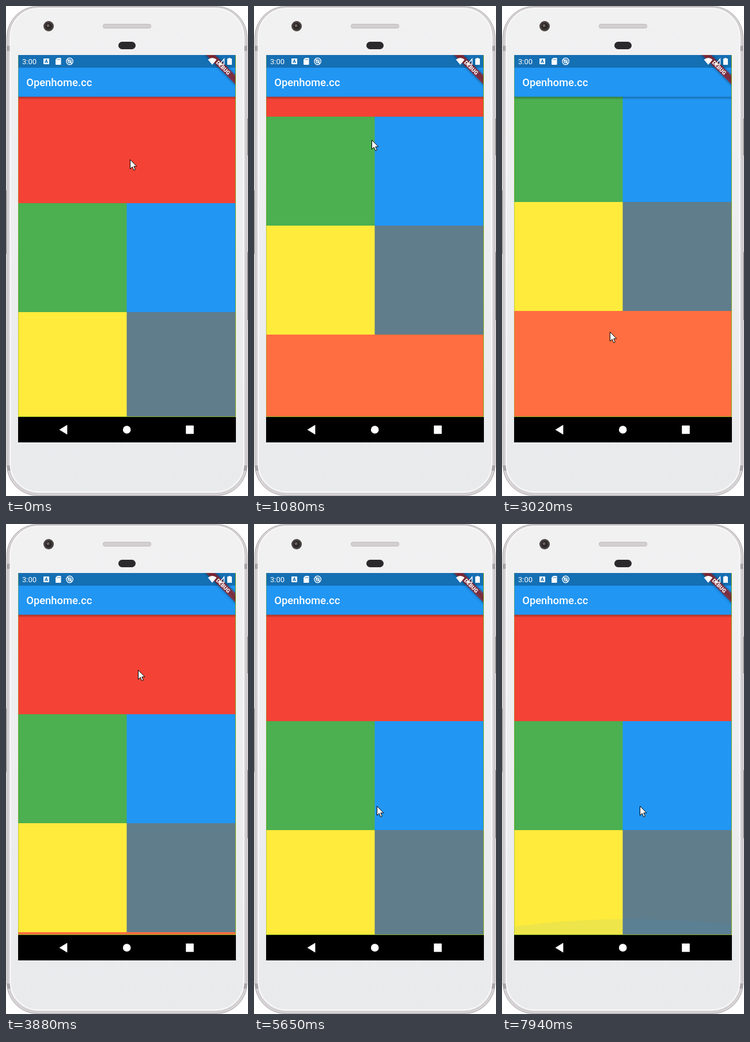
Write an HTML page that moves like this. It is 420 px wide and 850 px high and loops after 8100 ms.

```html
<!DOCTYPE html>
<html lang="en">
<head>
<meta charset="utf-8">
<style>
html, body { margin: 0; height: 100%; overflow: hidden; background: #fff; }
svg { display: block; width: 420px; height: 850px; }
text { font-family: Roboto, sans-serif; fill: #fff; }
.shadow { filter: blur(2.5px); opacity: .5; }
</style>
</head>
<body>
<svg viewBox="0 0 420 850">
  <defs>
    <linearGradient id="face" x2="0" y2="1">
      <stop offset="0" stop-color="#f1f1f2"/><stop offset="1" stop-color="#e9eaec"/>
    </linearGradient>
    <linearGradient id="shade" x2="0" y2="1">
      <stop offset="0" stop-opacity=".3"/><stop offset="1" stop-opacity="0"/>
    </linearGradient>
    <clipPath id="screen"><rect x="21" y="85" width="378" height="672"/></clipPath>
    <clipPath id="view"><rect x="21" y="157" width="378" height="555"/></clipPath>
  </defs>

  <!-- phone -->
  <rect x="306" width="11" height="6" rx="1" fill="#918c8f"/>
  <path d="M0 320h3v110H0zM417 195h3v64h-3zM417 427h3v118h-3z" fill="#aaa6a8"/>
  <rect x="1.5" y=".5" width="417" height="849" rx="54" fill="#dcd9db" stroke="#a39ea1"/>
  <rect x="4.5" y="2.5" width="411" height="844" rx="52" fill="none" stroke="#c3bec1"/>
  <path d="M2 69h7v9H2zM411 69h7v9h-7zM2 797h7v9H2zM411 797h7v9h-7z" fill="#a9a5a8"/>
  <rect x="7.500" y="4" width="405" height="839" rx="49" fill="url(#face)" stroke="#f9f9fa" stroke-width="2"/>
  <circle cx="74" cy="35" r="9" fill="#4b4443"/>
  <circle cx="74" cy="35" r="6" fill="#2c2728"/>
  <circle cx="73" cy="34" r="2.500" fill="#67605f"/>
  <rect x="168.500" y="31.500" width="83" height="7" rx="3" fill="#d3cfd1" stroke="#c0bbbe"/>
  <rect x="195" y="62" width="30" height="13" rx="6.500" fill="#2b292c"/>

  <g clip-path="url(#screen)">
    <g clip-path="url(#view)">
      <g id="tiles"></g>
      <ellipse id="topGlow" rx="565.500" fill="#2196f3"/>
      <ellipse id="bottomGlow" rx="565.500" fill="#2196f3"/>
    </g>
    <rect x="21" y="107" width="378" height="50.500" fill="#2196f3"/>
    <rect x="21" y="157.500" width="378" height="5" fill="url(#shade)"/>
    <rect x="21" y="85" width="378" height="22" fill="#156fb3"/>
    <text x="35.200" y="139" font-size="18.400" font-weight="500">Openhome.cc</text>
    <g transform="translate(377 107) rotate(45)">
      <rect class="shadow" x="-50" y="-5.500" width="100" height="11"/>
      <rect x="-50" y="-5.500" width="100" height="11" fill="#b71c1c" opacity=".63"/>
      <text y="3.300" font-size="9.400" font-weight="900" text-anchor="middle">DEBUG</text>
    </g>

    <!-- status icons -->
    <text x="28" y="101" font-size="13">3:00</text>
    <rect x="65" y="91" width="10" height="10" rx="1" fill="#fff"/>
    <path d="M67.500 99 70 93l2.500 6M68.400 97.200h3.200" fill="none" stroke="#156fb3" stroke-width="1.200"/>
    <path d="M89 90h5.500q1 0 1 1v10q0 1-1 1H87q-1 0-1-1v-8z" fill="#fff"/>
    <path d="M89.300 92v2M91.300 92v2M93.300 92v2" stroke="#156fb3" stroke-width=".8"/>
    <g fill="none" stroke="#fff" stroke-width="1.400">
      <circle cx="110.500" cy="96" r="5.700"/><circle cx="110.500" cy="96" r="2.600"/>
      <path d="M107 92.500l7.500 7.500M370.500 101.300h8V92z"/>
    </g>
    <path d="M350.500 93q7.500-6 15 0l-7.500 9z" fill="#fff"/>
    <path d="M386.500 90h3v1.200h2.500v10.800h-8V91.200h2.500z" fill="#fff"/>

    <rect x="21" y="713" width="378" height="44"/>
    <path d="M21.500 712.500V85" fill="none" stroke="#86a91d" opacity=".5"/>
    <path d="M398.500 85V712.500H21" fill="none" stroke="#86b01d"/>
    <path d="M93 735l13-8v16zM312.500 728h13v14h-13z" fill="#fff" stroke="#fff" stroke-width=".6" stroke-linejoin="round"/>
    <circle cx="209.700" cy="735" r="6.800" fill="#fff"/>
  </g>

  <g id="cursor">
    <path d="M.5 .5v16l3.700-3.500 2.700 6 2.500-1.100-2.600-5.800h5z" fill="#fff" stroke="#000" stroke-linejoin="round"/>
    <circle id="press" r="15" fill="#ff3" opacity=".5"/>
  </g>
</svg>
<script>
const $ = id => document.getElementById(id);
const { PI, sin, cos, floor, ceil, round, min, max } = Math;
const LOOP = 8100, START = 460, BURST = 852, STEP = BURST / 11;
const WAVE_START = 5420, WAVE = 770, WAVE_PEAK = 6490;

// Where the pointer is as each burst begins, and how far it swings away in between
const stops = [
  { x: 215, y: 266, swing: -22 }, { x: 202, y: 245, swing: 0 }, { x: 195, y: 632, swing: -370 },
  { x: 187, y: 565, swing: 310 }, { x: 229, y: 253, swing: 10 }, { x: 192, y: 469, swing: 0 }
];

const mix = (a, b, p) => a + (b - a) * p;
const smooth = p => p * p * (3 - 2 * p);
const progress = (t, from, to) => min(1, max(0, (t - from) / (to - from)));
const settle = (t, from, to) => 1 - (1 - progress(t, from, to)) ** 2;
const bump = (t, from, to) => sin(PI * progress(t, from, to));

// Wide tiles first and last, pairs between them
$('tiles').innerHTML = ['#f44336', '#4caf50', '#2196f3', '#ffeb3b', '#607d8b', '#ff6e40'].map((color, i) => {
  const wide = i % 5 === 0, x = wide || i % 2 ? 21 : 209.5, y = 153 + 189 * ceil(i / 2);
  return `<rect x="${x}" y="${y}" width="${wide ? 378 : 189.5}" height="189" fill="${color}"/>`;
}).join('');

function burstPointer(t) {
  const burst = max(0, t - START) / BURST;
  const i = min(floor(burst), stops.length - 2), p = min(1, burst - i);
  const a = stops[i], b = stops[i + 1];
  return {
    x: mix(a.x, b.x, smooth(p)),
    y: mix(a.y, b.y, smooth(p)) + a.swing * sin(PI * p),
    pressed: a.swing !== 0 && p > .05 && p < .6,
    pull: 0
  };
}

// Repeated upward drags against the end of the list
function wavePointer(t) {
  const turns = (t - WAVE_PEAK) / WAVE, phase = turns - floor(turns);
  const begin = smooth(progress(t, WAVE_START, WAVE_START + 500)), last = stops.at(-1);
  return {
    x: mix(last.x, 239, begin),
    y: mix(last.y, 457 + 70 * cos(2 * PI * turns), begin),
    pressed: phase < .5,
    pull: .42 * begin * sin(PI * phase ** 2)
  };
}

const scrollAt = t =>
  161 * settle(t, 530, 1274) + 30 * settle(t, 1320, 1700) - 179 * settle(t, 3050, 3560) - 12 * settle(t, 3900, 4060);

function setGlow(el, x, edge, direction, pull, strength) {
  el.setAttribute('cx', mix(210, x, .5));
  el.setAttribute('cy', edge - direction * pull * 489.7);
  el.setAttribute('ry', pull * 565.5);
  el.setAttribute('opacity', pull * strength);
}

function draw(now) {
  const time = now % LOOP;
  const t = time < START ? 0 : START + floor((time - START + 1) / STEP) * STEP;
  const { x, y, pressed, pull } = t < WAVE_START ? burstPointer(t) : wavePointer(t);
  $('cursor').setAttribute('transform', `translate(${round(x)} ${round(y)})`);
  $('press').setAttribute('visibility', pressed ? 'visible' : 'hidden');
  $('tiles').setAttribute('transform', `translate(0 ${-round(scrollAt(t))})`);
  setGlow($('topGlow'), x, 157.5, 1, .465 * bump(t, 4060, 5260), .35);
  setGlow($('bottomGlow'), x, 712, -1, pull + .5 * bump(t, 2190, 2950), .22);
  requestAnimationFrame(draw);
}
draw(performance.now());
</script>
</body>
</html>
```
